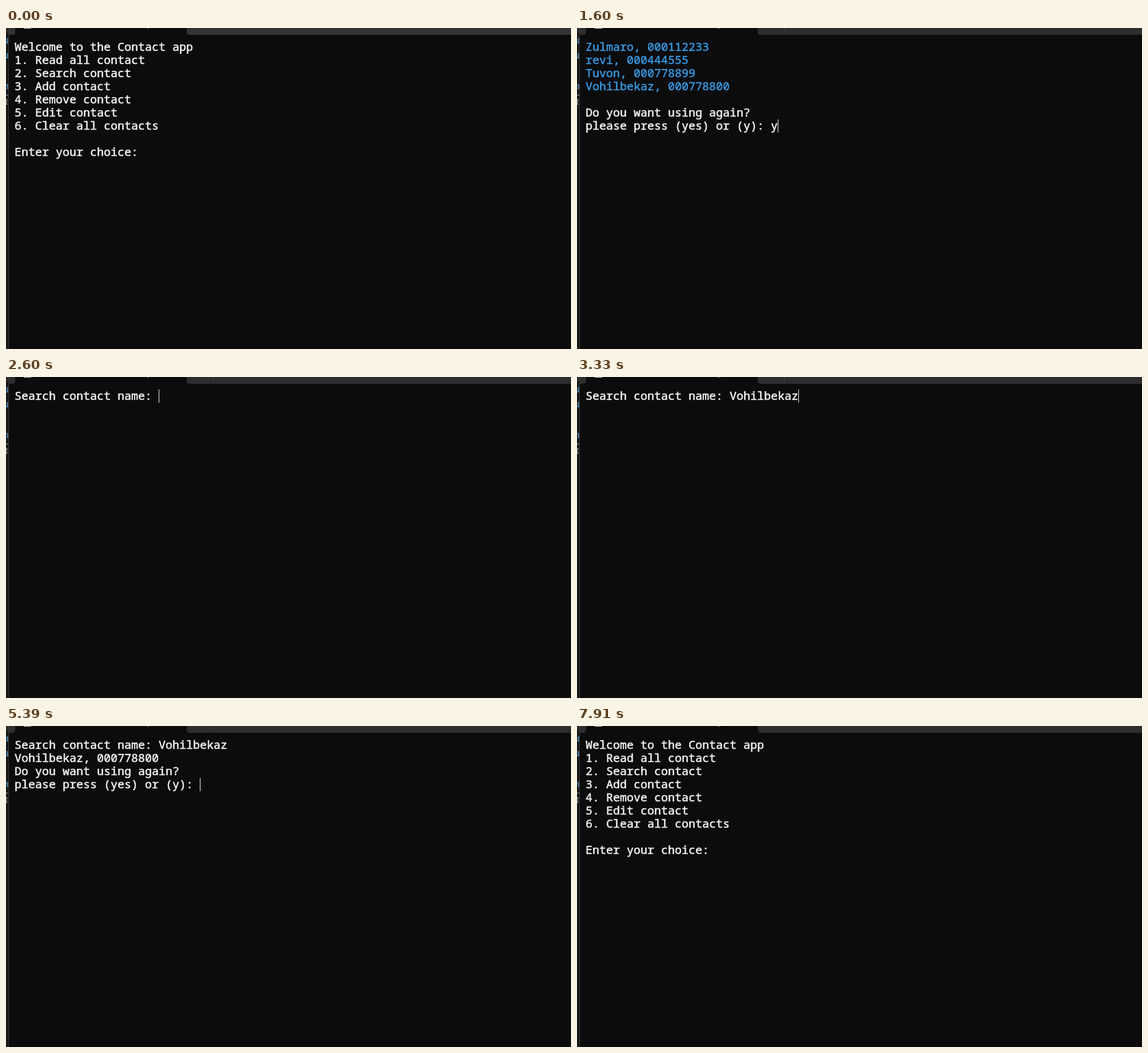
An HTML page for the animation above (8 s loop, 988 by 562 pixels).

```html
<!DOCTYPE html>
<html lang="en">
<head>
<meta charset="utf-8">
<title>Contact app</title>
<style>
  html, body { margin: 0; width: 100%; height: 100%; overflow: hidden; background: #0c0c0c; }
  #stage { position: relative; width: 988px; height: 562px; overflow: hidden; background: #0c0c0c; --bar: #2d2d2d; }
  #stage.fresh { --bar: #333; }
  #stage > * { position: absolute; }
  pre, .code { font-family: "Noto Sans Mono", monospace; }
  #screen { left: 15px; top: 21px; margin: 0; font-size: 20px; font-weight: 500; line-height: 23px; color: #f2f2f2; -webkit-text-stroke: 0.6px; font-variant-ligatures: none; }
  #screen span { color: #3a96dd; }
  #caret { width: 1px; height: 23px; background: #fff; }
</style>
</head>
<body>
<div id="stage">
  <svg width="988" height="562">
    <rect width="4" height="562" fill="#181818"/>
    <rect width="4" height="8" fill="#2b2b2b"/>
    <rect x="4" width="1" height="562" fill="#393939"/>
    <g style="fill: var(--bar)">
      <path d="M5 0H16V7Q16 12 11 12H5Z"/>
      <path d="M316 0H988V12H321Q316 12 316 7Z"/>
    </g>
    <rect x="362" width="1" height="8" fill="#454545"/>
    <rect x="31" width="13" height="1" fill="#ddd"/>
    <rect x="247" width="2" height="1" fill="#bbb"/>
    <svg class="code" width="4" height="562" font-size="17" fill="#4a86b4" stroke="#4a86b4" stroke-width="0.4">
      <text x="-5.5" y="27">u</text>
      <text x="-5.5" y="53">u</text>
      <text x="-5.5" y="107">n</text>
      <path d="M4 117.5H0M0 125.5H3M1 126V133M0 133.5H3" fill="none" stroke="#aaa" stroke-width="1"/>
    </svg>
  </svg>
  <pre id="screen"></pre>
  <div id="caret"></div>
</div>
<script>
const LOOP = 8000;
const name = "Vohilbekaz";
const again = "Do you want using again?\nplease press (yes) or (y): ";
const menu = `Welcome to the Contact app
1. Read all contact
2. Search contact
3. Add contact
4. Remove contact
5. Edit contact
6. Clear all contacts

Enter your choice: `;
const contacts = `Zulmaro, 000112233
revi, 000444555
Tuvon, 000778899
${name}, 000778800`;
const list = `<span>${contacts}</span>\n\n${again}`;
const search = n => "Search contact name: " + name.slice(0, n);
const found = `${search(10)}\n${name}, 000778800\n${again}`;

// [start in ms, screen content, caret visible]
const steps = [
  [0, menu, false], [270, menu, true], [860, menu, false], [930, menu + "1", true],
  [1200, list, true], [1600, list + "y", true],
  [1930, menu, true], [2070, menu, false], [2270, menu, true], [2340, menu + "2", true],
  [2600, search(0), true], [2670, search(3), true],
  [2870, search(4), true], [2970, search(5), true], [3070, search(6), true],
  [3270, search(8), true], [3330, search(10), true],
  [3920, search(10), false], [4120, search(10), true],
  [4190, found, true], [4790, found, false], [5390, found, true],
  [5920, found, false], [6120, found, true], [6650, found + "y", true],
  [7310, menu, true], [7910, menu, false]
];

const stage = document.getElementById("stage");
const output = document.getElementById("screen");
const caret = document.getElementById("caret");
let shown = null;

function show([, html, visible]) {
  output.innerHTML = html;
  const lines = output.textContent.split("\n");
  caret.style.left = 15 + 12 * lines.at(-1).length + "px";
  caret.style.top = 22 + 23 * (lines.length - 1) + "px";
  caret.style.visibility = visible ? "visible" : "hidden";
}

function draw() {
  const t = performance.now() % LOOP;
  const step = steps.findLast(s => s[0] <= t);
  stage.classList.toggle("fresh", t < 70);
  if (step !== shown) show(shown = step);
  requestAnimationFrame(draw);
}
draw();
</script>
</body>
</html>
```
